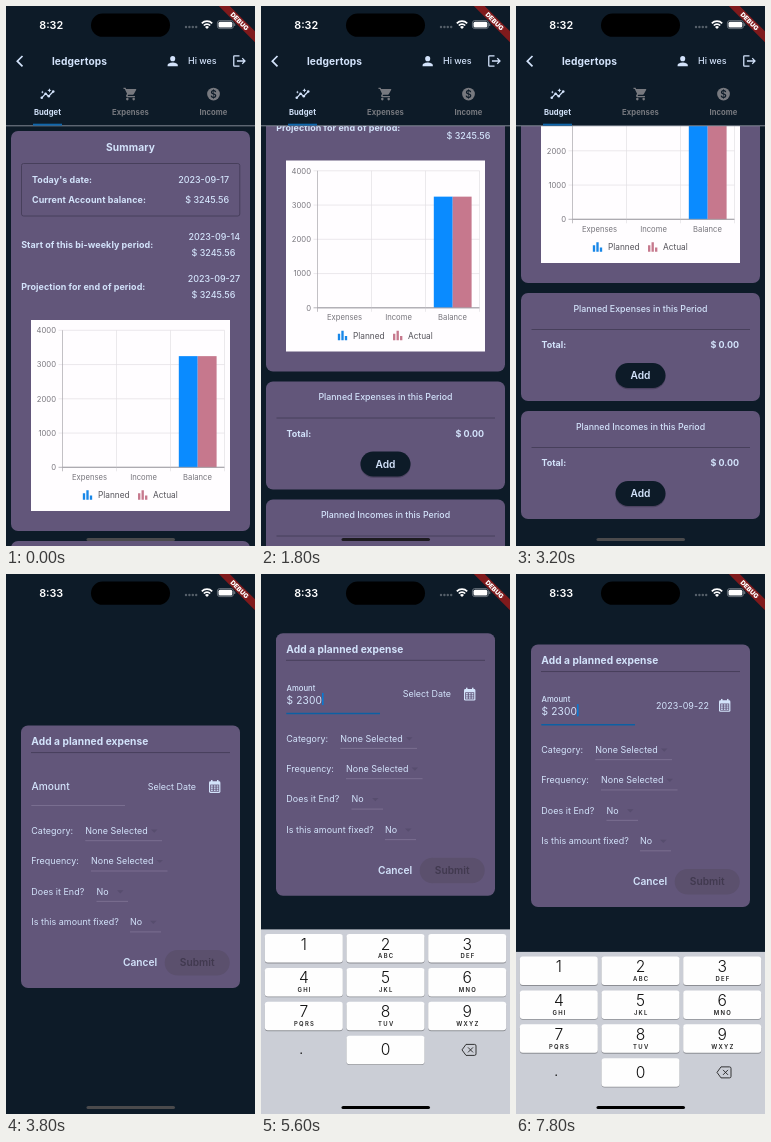
Write an HTML page that moves like this. It is 249 px wide and 540 px high and loops after 8000 ms.

```html
<!DOCTYPE html>
<html lang="en">
<head>
<meta charset="utf-8">
<title>Budget app</title>
<style>
html, body { margin: 0; width: 100%; height: 100%; overflow: hidden; background: #0d1b28; }
svg { display: block; width: 100vw; height: 100vh; font-family: Inter, Roboto, sans-serif; }
</style>
</head>
<body>
<svg id="stage" viewBox="0 0 249 540" preserveAspectRatio="none"></svg>
<script>
const STEP = 200, LOOP = 8000, W = 249, H = 540, KEYBOARD = 184.6;
const C = {
  bg: '#0d1b28', card: '#62567a', light: '#d3e3fb', line: '#453d59', rule: '#8a7fa0',
  dim: '#77797f', blue: '#0a8bff', pink: '#c6788d', accent: '#0c60a3', ink: '#453e5a'
};
const SCROLL = { 1000: 6, 1200: 28, 1400: 62, 1600: 110, 1800: 159.5, 2000: 236, 2200: 246, 2400: 248 };

// Drawing helpers
const text = (x, y, s, size = 8.93, o = {}) =>
  `<text x="${x}" y="${y}" font-size="${size}" font-weight="${o.w || 400}" fill="${o.fill || C.light}"` +
  ` text-anchor="${o.a || 'start'}" letter-spacing="${o.ls || 0}">${s}</text>`;
const rect = (x, y, w, h, fill, rx = 0, extra = '') =>
  `<rect x="${x}" y="${y}" width="${w}" height="${h}" rx="${rx}" fill="${fill}" ${extra}/>`;
const path = (d, stroke, width = 1, extra = '') =>
  `<path d="${d}" fill="none" stroke="${stroke}" stroke-width="${width}" ${extra}/>`;
const hline = (x1, x2, y, color, width = 0.7) => path(`M${x1} ${y}H${x2}`, color, width);
const caret = (x, y, fill) => `<path d="M${x - 3.2} ${y}h6.4l-3.2 3.2z" fill="${fill}"/>`;
const move = (x, y, body) => `<g transform="translate(${x} ${y})">${body}</g>`;
const icon = (cx, cy, body, fill, size = 15.3) =>
  `<g transform="translate(${cx - size / 2} ${cy - size / 2}) scale(${size / 24})" fill="${fill}">${body}</g>`;
const shape = d => `<path d="${d}"/>`;

const ICONS = {
  cart: shape('M1 2v2h2l3.6 7.6-1.35 2.4A2 2 0 0 0 7 17h12v-2H7.4l1-1.9h7.2c.7 0 1.4-.4 1.7-1L21 5.5a1 1 0 0 0-.9-1.5H5.2l-.9-2z')
    + '<circle cx="7" cy="20" r="2"/><circle cx="17" cy="20" r="2"/>',
  person: '<circle cx="12" cy="8" r="4"/>' + shape('M12 14c-2.7 0-8 1.3-8 4v2h16v-2c0-2.7-5.3-4-8-4z'),
  logout: shape('M17 7l-1.4 1.4L18.2 11H8v2h10.2l-2.6 2.6L17 17l5-5zM4 5h8V3H4a2 2 0 0 0-2 2v14a2 2 0 0 0 2 2h8v-2H4z'),
  edit: shape('M3 17.2V21h3.8L17.8 9.9l-3.7-3.7zM20.7 7a1 1 0 0 0 0-1.4l-2.3-2.3a1 1 0 0 0-1.4 0l-1.9 1.8 3.8 3.8z'),
  bars: shape('M4 9h4v11H4zM10 4h4v16h-4zM16 13h4v7h-4z'),
  coin: '<circle cx="12" cy="12" r="10"/>',
  trend: path('M3 18L9 11.5L14 15.5L21 8', 'currentColor', 2)
    + [[3, 18], [9, 11.5], [14, 15.5], [21, 8]].map(p => `<circle cx="${p[0]}" cy="${p[1]}" r="2"/>`).join('')
    + shape('M15 3l1 2.3 2.2 1-2.2 1-1 2.2-1-2.2-2.2-1 2.2-1zM4 6.5l.7 1.8 1.8.7-1.8.7L4 11.5l-.7-1.8L1.5 9l1.8-.7z')
};

const clamp = v => Math.max(0, Math.min(1, v));
const spring = ms => ms <= 0 ? 0 : 1 - (1 + 0.014 * ms) * Math.exp(-0.014 * ms);

function statusBar(t) {
  const dots = [0, 1, 2, 3].map(i => `<circle cx="${180 + i * 3.4}" cy="21" r="1.2" fill="#56606a"/>`).join('');
  const wifi = path('M195.8 17.3a7.3 7.3 0 0 1 10.4 0M197.8 19.5a4.5 4.5 0 0 1 6.4 0', '#fff', 1.7)
    + '<path d="M201 23l-2-2.1a2.8 2.8 0 0 1 4 0z" fill="#fff"/>';
  const battery = rect(211.4, 14.6, 16, 8, 'none', 2.4, 'stroke="#8b939b" stroke-width=".7"')
    + rect(212.5, 15.7, 13.8, 5.8, '#fff', 1.5) + rect(228.3, 17.3, 0.9, 2.8, '#8b939b', 0.4);
  const debug = `<g transform="translate(${W} 0) rotate(45)">`
    + rect(-26, 17.9, 52, 7.7, '#801a1c')
    + text(0, 24.1, 'DEBUG', 6.5, { w: 900, fill: '#fff', a: 'middle' }) + '</g>';
  return text(45.2, 22.6, t < 3400 ? '8:32' : '8:33', 10.8, { w: 600, fill: '#fff', a: 'middle' })
    + rect(85, 7.6, 79, 23.2, '#000', 11.6) + dots + wifi + battery + debug;
}

function header() {
  const tab = (x, glyph, label, color) =>
    `<g color="${color}">${icon(x, 88, ICONS[glyph], color)}</g>`
    + text(x, 109, label, 7.66, { w: 700, fill: color, a: 'middle', ls: 0.05 });
  return path('M16.5 50L11.3 55.2L16.5 60.4', C.light, 1.7)
    + text(46, 58.7, 'ledgertops', 10.2, { w: 700, ls: 0.1 })
    + icon(166.7, 55.2, ICONS.person, C.light) + text(182, 58.4, 'Hi wes', 8.93, { w: 500 })
    + icon(233.5, 55, ICONS.logout, C.light)
    + tab(41.5, 'trend', 'Budget', C.light) + tab(124.5, 'cart', 'Expenses', C.dim) + tab(207.5, 'coin', 'Income', C.dim)
    + text(207.5, 91.6, '$', 10, { w: 600, fill: C.bg, a: 'middle' })
    + hline(0, W, 119.8, '#8d929d', 0.9) + rect(27, 117.7, 29, 1.9, '#0f66ab');
}

function chart() {
  const left = 56.5, right = 218.5, base = 461.3, unit = 34.25, col = 54;
  let s = rect(25, 314, 199, 191, '#fffdff');
  for (let i = 0; i <= 4; i++) {
    const y = base - i * unit;
    s += hline(left - 4, right, y, i ? '#e2e0e4' : '#9a989e')
      + text(50, y + 2.8, i * 1000, 7.66, { fill: '#77757c', a: 'end' });
  }
  ['Expenses', 'Income', 'Balance'].forEach((label, i) => {
    s += text(left + (i + 0.5) * col, 473.8, label, 7.66, { fill: '#77757c', a: 'middle' });
  });
  for (let i = 0; i <= 3; i++) s += path(`M${left + i * col} ${base - 4 * unit}V${base + 4}`, i ? '#e2e0e4' : '#a9a7ad', 0.7);
  const top = base - 3.24556 * unit;
  return s + rect(172.8, top, 18.9, base - top, C.blue) + rect(191.7, top, 18.9, base - top, C.pink)
    + hline(left, right, base, '#a09ea5', 0.8)
    + icon(81.5, 489, ICONS.bars, '#1887e8', 14) + text(92, 492.4, 'Planned', 8.3, { fill: '#55535a' })
    + icon(136.7, 489, ICONS.bars, C.pink, 14) + text(147, 492.4, 'Actual', 8.3, { fill: '#55535a' });
}

function planCard(y, title) {
  return move(0, y, rect(5, 0, 239, 108, C.card, 7)
    + text(124.5, 18.6, title, 8.8, { a: 'middle', w: 500 })
    + hline(15.5, 234, 36.5, C.line, 0.9)
    + text(25.5, 55, 'Total:', 8.93, { w: 700 }) + text(223, 55, '$ 0.00', 8.93, { w: 700, a: 'end' })
    + rect(99.5, 71.2, 50, 25, '#3f3750', 12.5, 'opacity=".6"') + rect(99.5, 70, 50, 25, C.bg, 12.5)
    + text(124.5, 86.2, 'Add', 10.2, { w: 600, a: 'middle' }));
}

function summary() {
  const bold = { w: 700, ls: 0.08 }, end = { w: 500, a: 'end' };
  const period = (y, label, date) => text(15.2, y, label, 8.93, bold)
    + text(234, y - 8, date, 8.93, end) + text(229.3, y + 8, '$ 3245.56', 8.93, end);
  return rect(5, 125, 239, 400, C.card, 7)
    + text(124.5, 144.7, 'Summary', 10.2, { w: 700, a: 'middle', ls: 0.15 })
    + rect(15.5, 157.5, 218.3, 52.5, 'none', 2, `stroke="${C.line}" stroke-width=".9"`)
    + text(26, 176.6, "Today's date:", 8.93, bold) + text(223, 176.6, '2023-09-17', 8.93, end)
    + text(26, 197.4, 'Current Account balance:', 8.93, bold) + text(223, 197.4, '$ 3245.56', 8.93, end)
    + period(242, 'Start of this bi-weekly period:', '2023-09-14')
    + period(284, 'Projection for end of period:', '2023-09-27') + chart();
}

function budgetPage(t) {
  const scroll = t < 1000 ? 0 : SCROLL[Math.min(t, 2400)];
  return rect(0, 0, W, H, C.bg)
    + '<clipPath id="list"><rect y="120" width="249" height="420"/></clipPath><g clip-path="url(#list)">'
    + move(0, -scroll, summary() + planCard(535, 'Planned Expenses in this Period')
      + planCard(653, 'Planned Incomes in this Period')) + '</g>' + header();
}

function amountField(t) {
  const float = clamp((t - 4350) / 170), focused = float > 0 && (t < 6400 || t >= 7600);
  const typed = '2300'.slice(0, Math.max(0, (t - 4600) / STEP));
  let s = text(25.5, 216 - 7 * float, 'Amount', 10.2 - 2.5 * float, { w: 500 });
  if (float === 1) s += text(25.5, 222, '$ ' + typed, 10.2, { ls: 0.15 });
  if (focused && float === 1) s += rect(typed ? 35.6 + typed.length * 6.35 : 35, 211.2, 1.6, 12.2, '#0b78cf');
  return s + hline(25.3, 119, focused ? 231.8 : 231.5, focused ? C.accent : C.rule, focused ? 1.3 : 0.6);
}

function calendarIcon() {
  let s = rect(203, 207.3, 11.4, 11.6, C.light, 1.4) + rect(205, 206, 1.5, 2.5, C.light) + rect(211, 206, 1.5, 2.5, C.light)
    + rect(204.2, 210.6, 9, 7.1, C.card);
  for (let i = 0; i < 9; i++) s += rect(205 + i % 3 * 2.8, 211.4 + Math.floor(i / 3) * 2.1, 1.8, 1.3, C.light);
  return s;
}

function expenseForm(t, shift) {
  const row = (y, label, x, value, end) => text(25.3, y, label, 8.93, { ls: 0.04 })
    + text(x, y, value, 8.93, { ls: 0.04 }) + caret(end - 7.7, y - 4.4, '#574d6e') + hline(x, end, y + 6.7, C.rule, 0.6);
  return rect(0, 0, W, H, C.bg) + move(0, shift,
    rect(15, 151.5, 219, 262.5, C.card, 7)
    + text(25.3, 171, 'Add a planned expense', 10.2, { w: 700, ls: 0.05 }) + hline(25, 224, 178.6, C.line, 0.9)
    + amountField(t)
    + (t < 7600 ? text(190, 215.8, 'Select Date', 8.93, { a: 'end' })
      : text(193, 215.8, '2023-09-22', 8.93, { a: 'end', ls: 0.1 }))
    + calendarIcon()
    + row(260, 'Category:', 79.3, 'None Selected', 156) + row(290.3, 'Frequency:', 85, 'None Selected', 161.5)
    + row(320.7, 'Does it End?', 90.5, 'No', 122) + row(351.2, 'Is this amount fixed?', 124, 'No', 155)
    + text(117, 392, 'Cancel', 10.2, { w: 600 })
    + rect(158.7, 376, 65, 25.5, '#5b506d', 12.75)
    + text(191.2, 392.2, 'Submit', 10.2, { w: 600, fill: '#41394f', a: 'middle' }));
}

function datePicker(t, shift) {
  const picked = t < 7200 ? 17 : 22;
  const colX = i => 39.6 + i * 28.2;
  let s = rect(20.5, 114.2, 208, 324.5, '#5e567a', 17.9)
    + text(36, 133.7, 'Select date', 10.2, { fill: C.ink, ls: 0.05 })
    + text(36, 173.2, picked === 17 ? 'Sun, Sep 17' : 'Fri, Sep 22', 15.3, { fill: C.ink })
    + icon(205.5, 167.5, ICONS.edit, C.ink) + hline(20.5, 228.5, 189.7, '#cfc6da', 0.8)
    + text(36, 209.2, 'September 2023', 7.9, { w: 700, fill: '#2d283b' })
    + caret(109.2, 205.3, '#2d283b')
    + path('M182 203.2l-3.2 3.3l3.2 3.3M209.5 203.2l3.2 3.3l-3.2 3.3', '#2d283b', 1.2);
  [...'SMTWTFS'].forEach((d, i) => { s += text(colX(i), 238.7, d, 7.9, { w: 700, a: 'middle' }); });
  for (let day = 1; day <= 30; day++) {
    const cell = day + 4, x = colX(cell % 7), y = 261.9 + Math.floor(cell / 7) * 26.1;
    if (day === picked || day === 17)
      s += `<circle cx="${x}" cy="${y}" r="12.8" fill="${day === picked ? '#045a9b' : 'none'}" stroke="${C.light}" stroke-width=".9"/>`;
    s += text(x, y + 3.7, day, 10, { w: 600, a: 'middle', fill: day === picked ? '#fff' : C.light });
  }
  s += text(136.7, 425.3, 'Cancel', 9.9, { w: 600 }) + text(195.5, 425.3, 'OK', 9.9, { w: 600 });
  const opacity = t === 6400 ? 0.35 : t === 7600 ? 0.3 : 1;
  return `<g opacity="${opacity}">${rect(0, 0, W, H, '#000', 0, 'opacity=".62"')}${move(0, shift, s)}</g>`;
}

function keyboard(up) {
  const groups = ['', 'ABC', 'DEF', 'GHI', 'JKL', 'MNO', 'PQRS', 'TUV', 'WXYZ'];
  const digitStyle = { a: 'middle', fill: '#111', w: 300 };
  const key = (col, row, digit, letters) => {
    const x = 3.8 + col * 81.7, y = 4.6 + row * 33.9;
    return rect(x, y + 0.9, 78, 28.5, '#8c8e94', 3) + rect(x, y, 78, 28.5, '#fefefe', 3)
      + text(x + 39, y + (letters || digit === 1 ? 15.6 : 19.8), digit, 15.6, digitStyle)
      + text(x + 39.8, y + 24.5, letters, 5.9, { a: 'middle', fill: '#222', w: 600, ls: 1.3 });
  };
  let s = rect(0, 0, W, KEYBOARD + 1, '#cbced6');
  groups.forEach((letters, i) => { s += key(i % 3, Math.floor(i / 3), i + 1, letters); });
  s += key(1, 3, 0, '') + text(40.3, 124.5, '.', 15.6, digitStyle)
    + path('M205 115h8.5q1.5 0 1.5 1.5v8q0 1.5-1.5 1.5h-8.5l-4-5.5zM207 118l5 5m0-5l-5 5', '#222', 0.9, 'stroke-linejoin="round"');
  return move(0, H - KEYBOARD * up, s);
}

function scene(t) {
  const up = t < 6400 ? spring(t - 4350) : t < 7600 ? 1 - spring(t - 6350) : spring(t - 7540);
  const shift = -up * KEYBOARD / 2;
  const slide = t < 3400 ? 1 : t < 3600 ? 0.35 : t < 3800 ? 0.03 : 0;
  let s = '';
  if (slide) s += move(-(1 - slide) * W / 3, 0, budgetPage(t));
  if (slide < 1) s += move(slide * W, 0, expenseForm(t, shift));
  if (t >= 6400 && t <= 7600) s += datePicker(t, shift);
  s += statusBar(t);
  if (up > 0.005) s += keyboard(up);
  const pill = up > 0.1 ? '#000' : t >= 1200 && t < 2000 ? '#1d1b20' : '#4a4a4c';
  return s + rect(80.5, 531.9, 88.5, 3.2, pill, 1.6);
}

const stage = document.getElementById('stage');
let shown = -1;
function tick() {
  const t = Math.floor(performance.now() % LOOP / STEP) * STEP;
  if (t !== shown) stage.innerHTML = scene(shown = t);
  requestAnimationFrame(tick);
}
tick();
</script>
</body>
</html>
```
